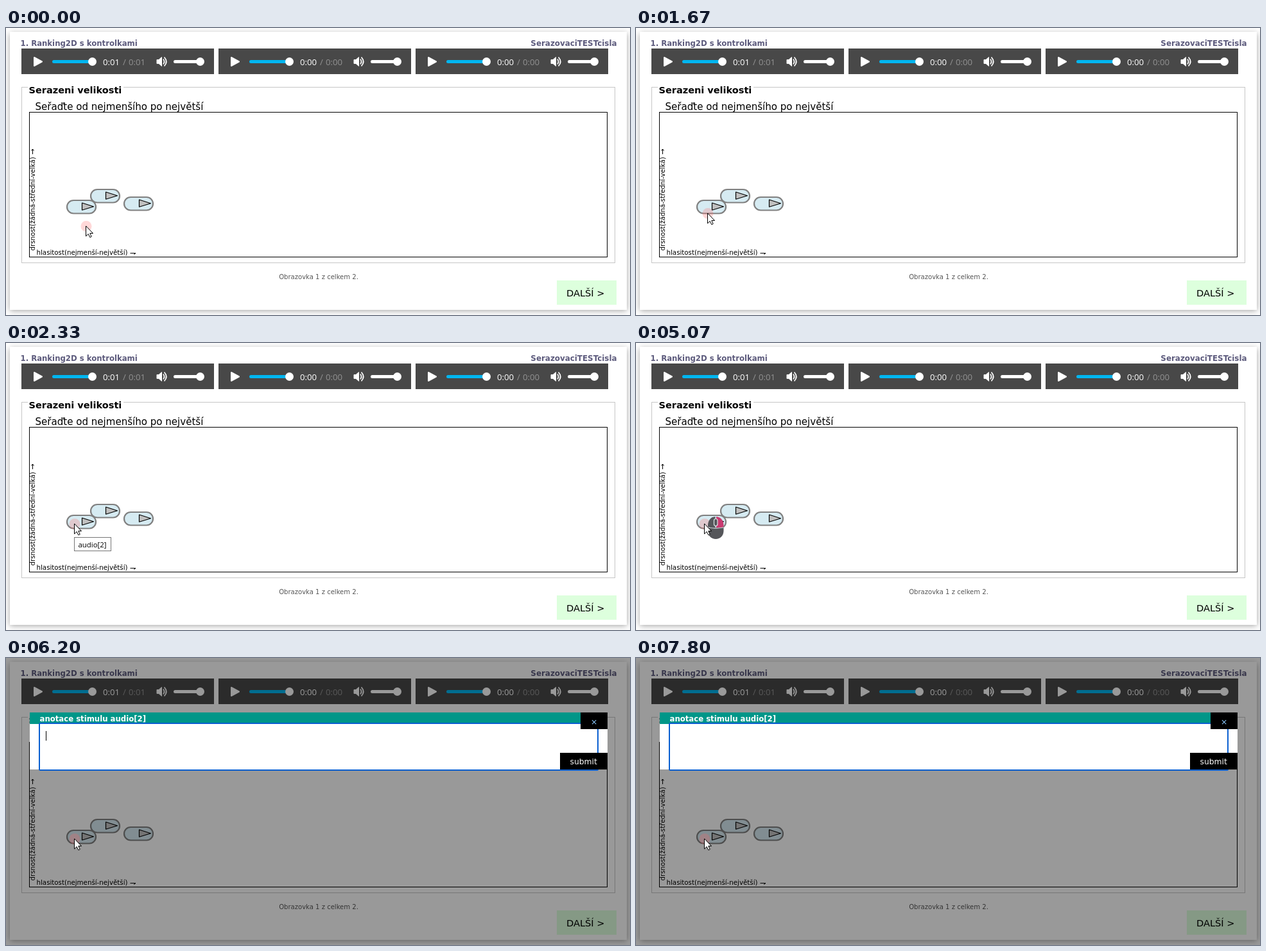
An HTML page with a canvas for the animation above (8000 ms loop, 972 by 448 pixels).

```html
<!DOCTYPE html>
<html lang="cs">
<head>
<meta charset="utf-8">
<title>Ranking2D</title>
<style>
  html, body { margin: 0; width: 100%; height: 100%; overflow: hidden; background: #fff; }
  canvas { display: block; }
</style>
</head>
<body>
<canvas id="stage" width="972" height="448"></canvas>
<script>
const ctx = document.getElementById('stage').getContext('2d');
const LOOP = 8000;
const SANS = '"DejaVu Sans", sans-serif';
const UI = '"Open Sans", sans-serif';

function text(str, x, y, size, color, { bold = false, align = 'left', family = SANS } = {}) {
  ctx.font = `${bold ? 'bold ' : ''}${size}px ${family}`;
  ctx.textAlign = align;
  ctx.fillStyle = color;
  ctx.fillText(str, x, y);
}

function rect(x, y, w, h, color) {
  ctx.fillStyle = color;
  ctx.fillRect(x, y, w, h);
}

function frame(x, y, w, h, color) {
  ctx.strokeStyle = color;
  ctx.lineWidth = 1;
  ctx.strokeRect(x + 0.5, y + 0.5, w - 1, h - 1);
}

function disc(x, y, r, color) {
  ctx.fillStyle = color;
  ctx.beginPath();
  ctx.arc(x, y, r, 0, Math.PI * 2);
  ctx.fill();
}

// Draws an SVG path at an offset, with optional fill and stroke.
function shape(d, x, y, fill, stroke, width = 1) {
  const path = new Path2D(d);
  ctx.save();
  ctx.translate(x, y);
  ctx.lineJoin = 'round';
  if (fill) { ctx.fillStyle = fill; ctx.fill(path); }
  if (stroke) { ctx.strokeStyle = stroke; ctx.lineWidth = width; ctx.stroke(path); }
  ctx.restore();
}

function bar(x, y, w, h, color) {
  ctx.fillStyle = color;
  ctx.beginPath();
  ctx.roundRect(x, y, w, h, h / 2);
  ctx.fill();
}

function player(x, time) {
  rect(x, 32, 300, 40, '#484848');
  shape('M20 14L32 20.5L20 27Z', x, 32, '#fff', '#fff', 2);
  bar(x + 48, 50, 62, 5, '#00b6f0');
  disc(x + 110.5, 52.5, 6.5, '#fff');
  text(time, x + 127, 58, 13.2, '#fff', { family: UI });
  text('/', x + 158, 58, 13.2, '#929292', { family: UI });
  text(time, x + 167, 58, 13.2, '#929292', { family: UI });
  shape('M211 17.5H214L218.5 13.5V27.5L214 23.5H211Z', x, 32, '#fff', '#fff');
  shape('M221 16.5Q224 20.5 221 24.5M222.5 13.5Q229 20.5 222.5 27.5', x, 32, null, '#fff', 1.7);
  bar(x + 237, 50, 42, 5, '#fff');
  disc(x + 278.5, 52.5, 6.5, '#fff');
}

function pill(x, y) {
  ctx.beginPath();
  ctx.roundRect(x + 1, y + 1, 45, 20.5, 10.2);
  ctx.fillStyle = 'rgba(173,216,230,.5)';
  ctx.fill();
  ctx.strokeStyle = '#808080';
  ctx.lineWidth = 2.2;
  ctx.stroke();
  shape('M24.5 5L42.5 10.8L24.5 16.2Z', x, y, '#c0c0c0', '#000', 1.2);
}

function page() {
  rect(0, 0, 972, 448, '#fff');
  ctx.save();
  ctx.shadowColor = 'rgba(0,0,0,.36)';
  ctx.shadowBlur = 9;
  ctx.shadowOffsetY = 1.5;
  rect(6, 6, 961, 434, '#fff');
  ctx.restore();

  text('1. Ranking2D s kontrolkami', 22.5, 28, 11.7, '#5c5a7c', { bold: true });
  text('SerazovaciTESTcisla', 951.5, 28, 11.9, '#5c5a7c', { bold: true, align: 'right' });
  ['0:01', '0:00', '0:00'].forEach((time, i) => player(24 + 307 * i, time));

  frame(24, 92, 925, 275, '#c6c6c6');
  rect(34, 90, 149, 6, '#fff');
  text('Serazeni velikosti', 35.5, 102, 14.5, '#000', { bold: true });
  text('Seřaďte od nejmenšího po největší', 45.5, 128, 15.05, '#000');
  frame(36, 131, 901, 227, '#000');

  text('hlasitost(nejmenší-největší)', 47.5, 354, 10.25, '#000');
  shape('M193.5 351.5H202L199 353.5', 0, 0, null, '#000');
  ctx.save();
  ctx.translate(44.5, 347.5);
  ctx.rotate(-Math.PI / 2);
  text('drsnost(žádná-střední-velká)', 0, 0, 10.2, '#000');
  ctx.restore();
  shape('M41.5 197V189M39.5 191.5L41.5 189L43.5 191.5', 0, 0, null, '#000');

  pill(131, 251);
  pill(183, 263);
  pill(94, 268);

  text('Obrazovka 1 z celkem 2.', 487, 392, 10.05, '#555', { align: 'center' });
  rect(858, 394, 93, 38, '#dfd');
  text('DALŠÍ >', 873, 419, 14.6, '#000');
}

function dialog(caretOn) {
  rect(0, 0, 972, 448, 'rgba(0,0,0,.4)');
  rect(37, 85, 900, 89, '#fff');
  rect(37, 85, 900, 18, '#009688');
  text('anotace stimulu audio[2]', 52.5, 99, 11.7, '#fff', { bold: true });
  ctx.beginPath();
  ctx.roundRect(52, 102, 870, 73, 1);
  ctx.fillStyle = '#fff';
  ctx.fill();
  ctx.strokeStyle = '#0a5fd0';
  ctx.lineWidth = 2;
  ctx.stroke();
  rect(895, 85, 42, 26, '#000');
  text('×', 916, 104, 12.2, '#8ccbff', { align: 'center' });
  rect(863, 148, 74, 26, '#000');
  text('submit', 878.5, 166, 12.3, '#fff');
  if (caretOn) rect(62, 114, 1, 15, '#000');
}

function mouseIcon() {
  const dark = '#55565a';
  shape('M112 288.5H136.5V293C136.5 301 131 306 124.2 306S112 301 112 293Z', 0, 0, dark);
  shape('M123.5 271C116.5 271.5 112 277 112 285V287Q117 289 123.5 288Z', 0, 0, dark);
  shape('M125 271C132 271.5 136.5 277 136.5 285V287Q131 289 125 288Z', 0, 0, '#c83a70');
  shape('M112 288Q124 291 136.5 288', 0, 0, null, '#c9ced2');
  ctx.beginPath();
  ctx.roundRect(121.5, 274.5, 5.5, 11, 2.7);
  ctx.fillStyle = dark;
  ctx.fill();
  ctx.strokeStyle = '#dde3e6';
  ctx.lineWidth = 1.2;
  ctx.stroke();
}

function tooltip() {
  rect(106, 303, 58, 22, '#fff');
  frame(106, 303, 58, 22, '#767676');
  text('audio[2]', 112.5, 319, 11.4, '#000', { family: UI });
}

// The pointer advances in nine ticks of 1/15 s.
function pointerAt(t) {
  const step = t < 1330 ? 0 : Math.min(9, 1 + Math.floor((t - 1330 + 4) / 67.5));
  const p = step / 9;
  const ease = p * p * (3 - 2 * p);
  return { x: 124 - Math.round(18 * ease), y: 309 - Math.floor(27 * ease) };
}

function draw(t) {
  const { x, y } = pointerAt(t);
  const open = t >= 6200;
  page();
  if (open) dialog(Math.floor((t - 6200) / 533.4) % 2 === 0);
  disc(x + 1, y + 0.5, 8.5, 'rgba(255,100,100,.25)');
  if (t >= 5000 && !open) mouseIcon();
  if (t >= 2330 && t < 5070) tooltip();
  shape('M.5 .5V16.5L4.2 13L6.8 18.3L9.2 17.2L6.8 12H11.5Z', x, y - 0.5, '#fff', '#000');
}

function tick() {
  draw(performance.now() % LOOP);
  requestAnimationFrame(tick);
}
tick();
</script>
</body>
</html>
```
